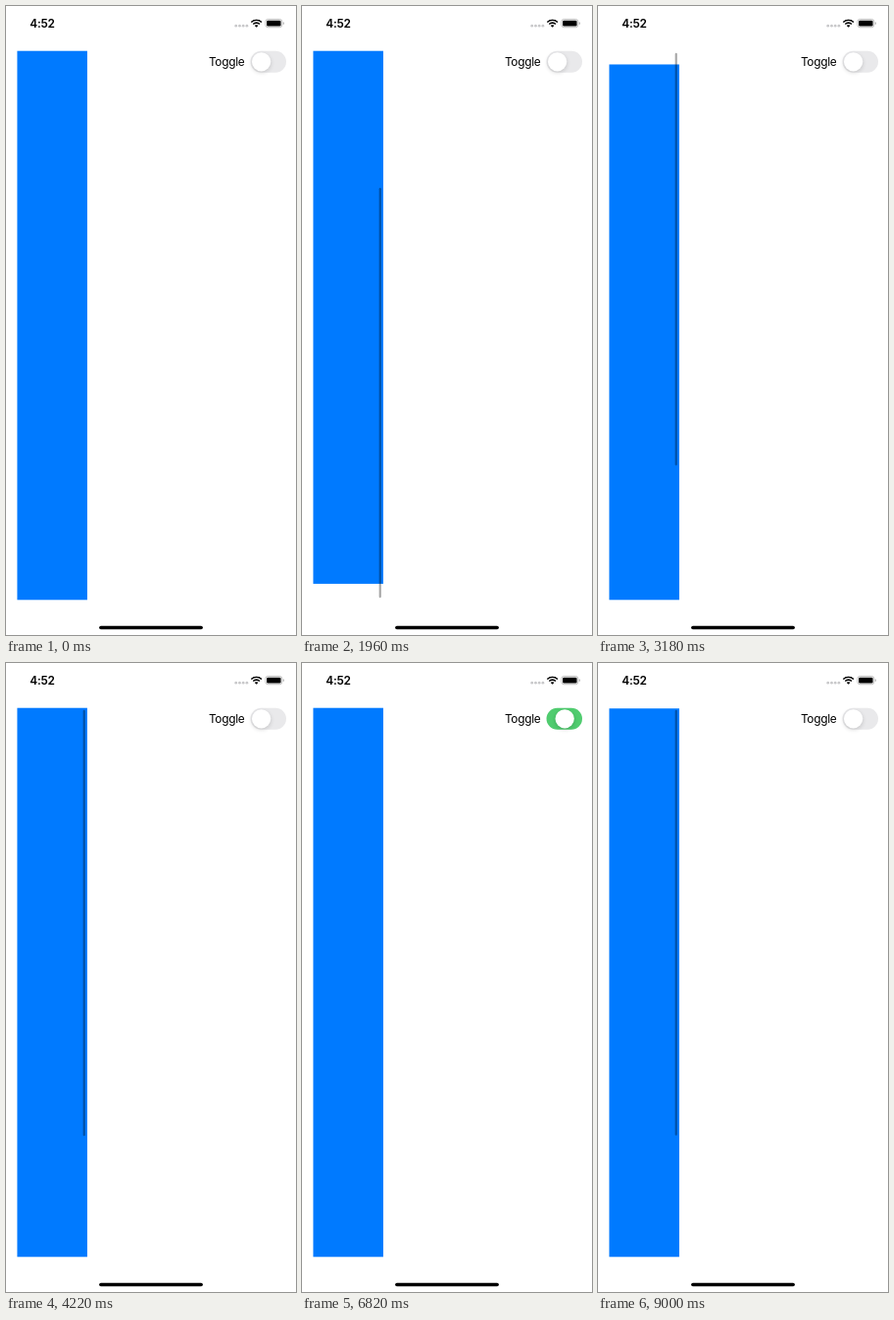
Write an HTML page with a canvas that moves like this. It is 296 px wide and 640 px high and loops after 9110 ms.

```html
<!DOCTYPE html>
<html lang="en">
<head>
<meta charset="utf-8">
<title>Toggle and scroll</title>
<style>
  html, body { margin: 0; width: 100%; height: 100%; overflow: hidden; background: #fff; }
  canvas { display: block; width: 296px; height: 640px; }
</style>
</head>
<body>
<canvas></canvas>
<script>
// The phone screen is 414 x 896 points, shown on a 296 x 640 stage.
const STAGE_W = 296, STAGE_H = 640, SCREEN_W = 414, SCREEN_H = 896;
const LOOP = 9110, STEP = 109;
const BLUE = '#007aff', GREEN = '#34c759';
const VIEW = { x: 16, y: 64, w: 100, h: 782 };
const CONTENT = 1000, RANGE = CONTENT - VIEW.h;
const BAR_INSET = 3, TRACK = VIEW.h - 2 * BAR_INSET;
const ON_AT = 4325, OFF_AT = 6710, SWITCH_MS = 400;
const FLING_MS = 150, BOUNCE_MS = 88, BOUNCE = 45;

// The picture advances in steps, counted from the start of each burst.
const burstStarts = [710, 1730, 2730, 4220, 6710, 7470, 8210];

const flicks = [
  { at: 660, edge: RANGE }, { at: 1715, edge: RANGE },
  { at: 2449, edge: 0 }, { at: 2900, edge: 0 }, { at: 3200, edge: 0 },
  { at: 7359, edge: RANGE }, { at: 8205, edge: 0 }
];

const canvas = document.querySelector('canvas');
const ctx = canvas.getContext('2d');
const density = window.devicePixelRatio || 1;
canvas.width = STAGE_W * density;
canvas.height = STAGE_H * density;

const clamp = (v, lo, hi) => Math.min(hi, Math.max(lo, v));
const mix = (a, b, p) => a + (b - a) * p;

function snap(t) {
  const start = burstStarts.filter(s => s <= t).pop();
  return start ? start + Math.floor((t - start) / STEP) * STEP : 0;
}

// Each flick runs to an edge, overshoots and settles like a damped spring.
function scrollAt(t) {
  let rest = 0, overshoot = 0;
  for (const { at, edge } of flicks) {
    if (t < at) break;
    const landed = at + (rest === edge ? 0 : FLING_MS);
    rest = mix(rest, edge, clamp((t - at) / FLING_MS, 0, 1));
    const u = Math.max(0, t - landed) / BOUNCE_MS;
    overshoot += (edge ? 1 : -1) * BOUNCE * u * Math.exp(1 - u);
  }
  return rest + overshoot;
}

function switchAt(t) {
  const eased = start => 1 - (1 - clamp((t - start) / SWITCH_MS, 0, 1)) ** 2;
  return eased(ON_AT) - eased(OFF_AT);
}

function rect(x, y, w, h, fill) {
  ctx.fillStyle = fill;
  ctx.fillRect(x, y, w, h);
}

function pill(x, y, w, h, r, fill) {
  ctx.beginPath();
  ctx.roundRect(x, y, w, h, r);
  ctx.fillStyle = fill;
  ctx.fill();
}

function disc(x, y, r, fill) {
  ctx.beginPath();
  ctx.arc(x, y, r, 0, Math.PI * 2);
  ctx.fillStyle = fill;
  ctx.fill();
}

function label(text, x, y, weight) {
  ctx.font = `${weight} 16.6px Inter, sans-serif`;
  ctx.letterSpacing = '-0.4px';
  ctx.fillStyle = '#000';
  ctx.fillText(text, x, y);
}

function drawWifi(x, y) {
  ctx.save();
  ctx.beginPath();
  ctx.moveTo(x, y);
  ctx.arc(x, y, 12, -Math.PI * 0.75, -Math.PI * 0.25);
  ctx.closePath();
  ctx.clip();
  disc(x, y, 3.8, '#000');
  ctx.strokeStyle = '#000';
  ctx.lineWidth = 2.25;
  for (const r of [6.6, 10.6]) {
    ctx.beginPath();
    ctx.arc(x, y, r, -Math.PI, 0);
    ctx.stroke();
  }
  ctx.restore();
}

function drawBattery(x, y) {
  ctx.beginPath();
  ctx.roundRect(x, y, 23.6, 11.6, 3.4);
  ctx.strokeStyle = '#a6a6a6';
  ctx.lineWidth = 1;
  ctx.stroke();
  pill(x + 1.7, y + 1.7, 20.2, 8.2, 1.8, '#000');
  pill(x + 25, y + 3.8, 1.4, 4, [0, 1.4, 1.4, 0], '#a6a6a6');
}

function drawStatus() {
  label('4:52', 34, 30.8, 600);
  for (let i = 0; i < 4; i++) disc(328.3 + i * 5.2, 28.3, 1.9, '#c8c8ca');
  drawWifi(357.5, 30.6);
  drawBattery(370.5, 18.8);
}

function drawSwitch(p) {
  const tint = 1 - (1 - p) ** 2.5;
  const rgb = [[233, 52], [233, 199], [235, 89]].map(([off, on]) => Math.round(mix(off, on, tint)));
  label('Toggle', 289.4, 85.4, 400);
  pill(349, VIEW.y, 51, 31, 15.5, `rgb(${rgb})`);
  ctx.save();
  ctx.shadowColor = 'rgba(0,0,0,.16)';
  ctx.shadowBlur = 4 * density;
  ctx.shadowOffsetY = 1.5 * density;
  disc(mix(364.5, 384.5, p), VIEW.y + 15.5, 13.5, '#fff');
  ctx.restore();
}

function drawScroll(t) {
  const offset = scrollAt(t);
  const inside = clamp(offset, 0, RANGE);
  const over = offset - inside;
  const top = VIEW.y + Math.max(0, -over);
  const bottom = VIEW.y + VIEW.h - Math.max(0, over);
  rect(VIEW.x, top, VIEW.w, bottom - top, BLUE);

  const barShown = (t >= burstStarts[0] && t < ON_AT) || t > OFF_AT + 700;
  if (!barShown) return;
  const length = TRACK * VIEW.h / CONTENT;
  const y = VIEW.y + BAR_INSET + (TRACK - length) * inside / RANGE + Math.max(0, over);
  pill(VIEW.x + VIEW.w - 6, y, 3, length - Math.abs(over), 1.5, 'rgba(0,0,0,.35)');
}

function draw(now) {
  const t = snap(now % LOOP);
  ctx.setTransform(canvas.width / SCREEN_W, 0, 0, canvas.height / SCREEN_H, 0, 0);
  rect(0, 0, SCREEN_W, SCREEN_H, '#fff');
  drawStatus();
  if (t >= ON_AT && t < OFF_AT) rect(VIEW.x, VIEW.y, VIEW.w, VIEW.w, GREEN);
  else drawScroll(t);
  drawSwitch(switchAt(t));
  pill(133, 883, 148, 5, 2.5, '#000');
}

const began = performance.now();
function tick() {
  draw(performance.now() - began);
  requestAnimationFrame(tick);
}
tick();
</script>
</body>
</html>
```
